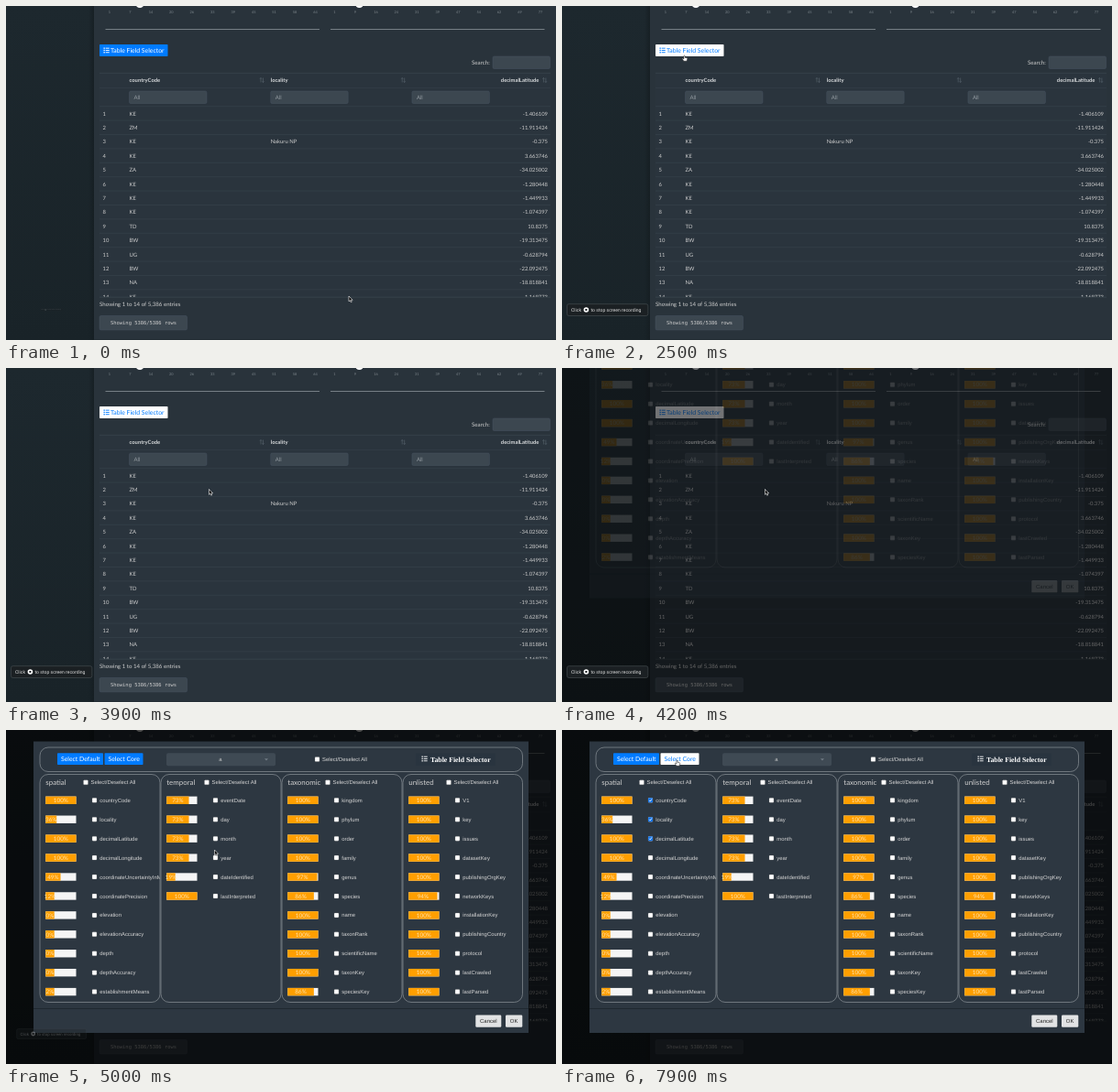
Recreate the animation shown at these times as an HTML page. Size 600 by 365 pixels, loop 8 s.

```html
<!DOCTYPE html>
<html lang="en">
<head>
<meta charset="utf-8">
<title>Table field selector</title>
<style>
  html, body { margin: 0; height: 100%; overflow: hidden; background: #29333b; }
  svg { display: block; width: 100vw; height: 100vh; text-rendering: geometricPrecision; }
  text { white-space: pre; }
</style>
</head>
<body>
<svg id="stage" viewBox="0 0 600 365" preserveAspectRatio="none"></svg>
<script>
const LATO = "Lato, sans-serif";
const ARIAL = "'Liberation Sans', Arial, sans-serif";
const SERIF = "'Liberation Serif', serif";
const MONO = "'DejaVu Sans Mono', monospace";
const LOOP = 8000;

// Markup helpers; text is centred vertically on y.
const rect = (x, y, w, h, fill, extra = "") =>
  `<rect x="${x}" y="${y}" width="${w}" height="${h}" fill="${fill}" ${extra}/>`;
const line = (x1, x2, y, color, width = .6) =>
  `<path d="M${x1} ${y}H${x2}" stroke="${color}" stroke-width="${width}"/>`;
const text = (x, y, value, size, fill = "#cdcdcd", font = LATO, anchor = "start", extra = "") =>
  `<text x="${x}" y="${y + size * .35}" font-size="${size}" fill="${fill}" font-family="${font}" text-anchor="${anchor}" ${extra}>${value}</text>`;
const outline = (x, y, w, h) =>
  rect(x, y, w, h, "none", 'rx="9" stroke="#8b9299" stroke-width=".7"');
const checkbox = (x, y, id = "") =>
  rect(x - 2.5, y - 2.5, 5, 5, "#fff", 'rx=".8" stroke="#777" stroke-width=".3"') +
  (id && `<g id="${id}">${rect(x - 2.5, y - 2.5, 5, 5, "#1675e8", 'rx=".8"')}
    <path d="M${x - 1.4} ${y}l1.1 1.2 1.8-2.5" fill="none" stroke="#fff" stroke-width=".8"/></g>`);
const listIcon = (x, y) => [0, 2.3, 4.6].map(d =>
  rect(x, y + d, 1.3, 1.3, "currentColor") + rect(x + 2.2, y + d + .2, 4, .9, "currentColor")).join("");
const button = (id, x, y, w, h, label, labelX, icon = "") =>
  `<g id="${id}">${rect(x, y, w, h, "#007bff", 'rx=".8"')}${icon}${text(labelX, y + h / 2, label, 6.87, "currentColor")}</g>`;

function slider(x, max, handleX) {
  let out = `<circle cx="${handleX}" cy="-2.6" r="4.6" fill="#fff"/>`;
  for (let i = 0; i <= 10; i++)
    out += text(x + i * 22.45, 6.5, Math.round(1 + (max - 1) * i / 10), 3.9, "#7f888e", LATO, "middle");
  return out + line(x - 4.5, x + 229, 25.5, "#8b9398", .8);
}

function tablePage() {
  const rows = [["KE", "-1.406109"], ["ZM", "-11.911424"], ["KE", "-0.375"], ["KE", "3.663746"],
    ["ZA", "-34.025002"], ["KE", "-1.280448"], ["KE", "-1.449933"], ["KE", "-1.074397"],
    ["TD", "10.8375"], ["BW", "-19.313475"], ["UG", "-0.628794"], ["BW", "-22.092475"],
    ["NA", "-18.818841"], ["KE", "-1.169773"]];
  const field = 'rx="1.5" stroke="#4c5a67" stroke-width=".4"';
  let out = rect(0, 0, 600, 365, "#29333b") + rect(0, 0, 96, 365, "url(#side)") +
    rect(90, 0, 6, 365, "url(#edge)") + line(96, 600, 364.5, "#1d262c") +
    slider(113, 64, 146) + slider(358.5, 77, 385.5) +
    button("fields", 102, 42, 74.5, 13, "Table Field Selector", 114, listIcon(106.5, 45.5)) +
    text(508, 62, "Search:", 6.2) + rect(531, 55, 62.5, 13.5, "#3c4750", field) +
    rect(102, 73, 492, 245, "#2a343d") + line(102, 594, 73.3, "#3f4a53") + line(102, 594, 89.5, "#343f48") +
    text(134.5, 81, "countryCode", 5.85, "#d5d8da", LATO, "start", 'font-weight="bold"') +
    text(288.7, 81, "locality", 5.85, "#d5d8da", LATO, "start", 'font-weight="bold"') +
    text(581.5, 81, "decimalLatitude", 5.85, "#d5d8da", LATO, "end", 'font-weight="bold"');
  for (let i = 0; i < 3; i++) {
    const x = 134.5 + i * 154.2;
    out += rect(x, 93, 84.5, 13.5, "#3c4750", field) + text(x + 5, 100, "All", 6, "#939ba1") +
      `<path d="M${x + 143.5} 83.5v-5m-1 1.2l1-1.2 1 1.2M${x + 146} 78.5v5m-1-1.2l1 1.2 1-1.2" fill="none" stroke="#65717a" stroke-width=".5"/>`;
  }
  out += '<g clip-path="url(#tableClip)">';
  rows.forEach(([code, latitude], i) => {
    const y = 117.5 + i * 15.4;
    out += line(102, 594, y - 7.8, "#38434c") + text(105.5, y, i + 1, 5.85) +
      text(134.5, y, code, 5.9) + text(591, y, latitude, 5.85, "#cdcdcd", LATO, "end");
  });
  return out + text(288.7, 148.3, "Nakuru NP", 5.9) + "</g>" + line(102, 594, 318.2, "#414c55") +
    text(102, 325.5, "Showing 1 to 14 of 5,386 entries", 6.15) +
    rect(102, 338.5, 95.5, 15.5, "#3c4750", field) +
    text(150, 346.5, "Showing 5386/5386 rows", 5.44, "#cdcdcd", MONO, "middle");
}

// Each field is "name" (100% filled) or "name:percent".
const groups = {
  spatial: "countryCode locality:36 decimalLatitude decimalLongitude coordinateUncertaintyInMeters:49 coordinatePrecision:12 elevation:0 elevationAccuracy:0 depth:0 depthAccuracy:0 establishmentMeans:2",
  temporal: "eventDate:73 day:73 month:73 year:73 dateIdentified:19 lastInterpreted",
  taxonomic: "kingdom phylum order family genus:97 species:86 name taxonRank scientificName taxonKey speciesKey:86",
  unlisted: "V1 key issues datasetKey publishingOrgKey networkKeys:94 installationKey publishingCountry protocol lastCrawled lastParsed"
};
const checkedFields = ["countryCode", "locality", "decimalLatitude"];

function modal() {
  let out = rect(30, 12.5, 540, 318.5, "#2d3741") + outline(37, 19, 526.5, 26.5) +
    button("default", 56, 25.3, 50, 12.8, "Select Default", 60) +
    button("core", 107.5, 25.3, 42, 12.8, "Select Core", 111.5) +
    rect(175, 25.3, 119, 14, "#3f4a54", 'rx="2"') + text(234, 32.3, "a", 5.9, "#cdcdcd", ARIAL, "middle") +
    '<path d="M282 31.2h4l-2 2.2z" fill="#707b84"/>' +
    checkbox(339.5, 32) + text(345, 32, "Select/Deselect All", 5.9, "#d5d5d5", ARIAL) +
    rect(447, 25.5, 87, 13.5, "#29343f") + `<g color="#fff">${listIcon(453.5, 28.5)}</g>` +
    text(463, 31.8, "Table Field Selector", 7.75, "#fff", SERIF, "start", 'font-weight="bold"');
  Object.entries(groups).forEach(([title, fields], column) => {
    const dx = column * 132;
    out += outline(37 + dx, 48.5, column < 3 ? 131 : 130.5, 249) +
      `<g transform="translate(${dx})" clip-path="url(#columnClip)">` +
      text(43.3, 57, title, 7.9) + checkbox(87, 57.3) +
      text(92.5, 57.3, "Select/Deselect All", 5.9, "#d5d5d5", ARIAL);
    fields.split(" ").forEach((field, row) => {
      const [name, percent = 100] = field.split(":");
      const y = 76.8 + row * 20.93, filled = Math.max(9.5, 33.3 * percent / 100);
      out += rect(43.2, y - 4.2, 33.3, 8.4, "#f5f5f5") + rect(43.2, y - 4.2, filled, 8.4, "#ff9f00") +
        text(43.2 + filled / 2, y, percent + "%", 6.3, "#ffe3ae", LATO, "middle") +
        checkbox(96.5, y, checkedFields.includes(name) ? "check-" + name : "") +
        text(102.3, y, name, 5.92, "#d5d5d5", ARIAL);
    });
    out += "</g>";
  });
  const footerButton = (x, w, label) => rect(x, 311.5, w, 13.3, "#e2e3e4", 'rx="1.2"') +
    text(x + w / 2, 318.2, label, 5.95, "#222", ARIAL, "middle");
  return out + line(30, 570, 304.5, "#1d252c", .8) + footerButton(512.3, 28, "Cancel") + footerButton(545, 18.3, "OK");
}

const tooltip = rect(5.5, 325.7, 88.3, 12.8, "#1b2023", 'rx="2" stroke="#4a5155" stroke-width=".6"') +
  text(10, 332, "Click", 5.1, "#ddd", "Roboto, sans-serif") +
  '<circle cx="26.4" cy="332" r="2.8" fill="#fff"/>' + rect(25.4, 331, 2, 2, "#1b2023") +
  text(31.5, 332, "to stop screen recording", 5.1, "#ddd", "Roboto, sans-serif");

stage.innerHTML = `<defs>
  <linearGradient id="side" x2="0" y2="1"><stop stop-color="#1d282e"/><stop offset="1" stop-color="#192328"/></linearGradient>
  <linearGradient id="edge"><stop stop-color="#141c20" stop-opacity="0"/><stop offset="1" stop-color="#141c20" stop-opacity=".7"/></linearGradient>
  <clipPath id="tableClip"><rect x="102" y="109" width="492" height="209"/></clipPath>
  <clipPath id="columnClip"><rect x="37" y="48" width="130.8" height="250"/></clipPath></defs>
  ${tablePage()}${rect(0, 0, 600, 365, "#000", 'id="backdrop"')}
  <g id="modal">${modal()}</g><g id="tooltip">${tooltip}</g>
  <g id="cursor">
    <path id="arrow" d="M0 0V5.8L1.3 4.6 2.2 6.7 3.2 6.3 2.3 4.3H4.1Z" fill="#000" stroke="#fff" stroke-width=".6"/>
    <path id="hand" d="M-.6 .4Q0-.4 .6 .4V2.3L2.9 2.8Q3.4 3 3.3 3.7L2.7 6.2H-.7L-2.3 3.7Q-2.2 2.8-1.4 3.3L-.6 4Z" fill="#fff" stroke="#111" stroke-width=".5"/>
  </g>`;

const $ = id => document.getElementById(id);
const clamp = v => Math.min(1, Math.max(0, v));
const ramp = (t, from, to) => clamp((t - from) / (to - from));
const smooth = k => k * k * (3 - 2 * k);
const mix = (a, b, k) => a + (b - a) * k;

function track(keys, t) {
  let i = keys.findIndex(key => key[0] > t);
  if (i < 0) return keys.at(-1).slice(1);
  if (i === 0) return keys[0].slice(1);
  const a = keys[i - 1], b = keys[i], k = smooth(ramp(t, a[0], b[0]));
  return a.slice(1).map((v, n) => mix(v, b[n + 1], k));
}

const cursorPath = [[500, 374, 317], [1400, 133.5, 54], [3150, 133.5, 54], [3600, 221.5, 132.5],
  [4650, 221.5, 132.5], [5000, 227.5, 131], [5500, 128, 33], [6080, 124, 32], [6300, 88, 30.5],
  [7100, 88, 30.5], [7450, 122, 32.5], [7900, 125.5, 33]];
const tooltipScale = [[0, .28, .25], [100, .4, .35], [200, .6, .55], [450, .6, .55], [600, 1, 1],
  [4700, 1, 1], [5000, .86, .3], [5250, .7, 0]];

// k = 0 is the blue button, k = 1 the inverted white one.
function invert(id, k) {
  const blend = (a, b) => `rgb(${a.map((v, i) => mix(v, b[i], k))})`;
  const blue = [0, 123, 255], white = [255, 255, 255];
  $(id).firstElementChild.setAttribute("fill", blend(blue, white));
  $(id).setAttribute("color", blend(white, blue));
}

function draw(t) {
  invert("fields", ramp(t, 1370, 1570));
  invert("default", ramp(t, 6270, 6520) - ramp(t, 7280, 7530));
  invert("core", ramp(t, 5430, 5650) - ramp(t, 6140, 6390) + ramp(t, 7330, 7580));

  $("backdrop").setAttribute("opacity", .7 * ramp(t, 4050, 4260));
  $("modal").setAttribute("opacity", ramp(t, 4178, 4328));
  $("modal").setAttribute("transform", `translate(0 ${-80 * (1 - ramp(t, 4200, 4500)) ** 2})`);
  checkedFields.forEach(name => $("check-" + name).setAttribute("opacity", t >= 6800 ? 1 : 0));

  const [scale, opacity] = track(tooltipScale, t);
  $("tooltip").setAttribute("opacity", opacity);
  $("tooltip").setAttribute("transform", `translate(49.7 332) scale(${scale}) translate(-49.7 -332)`);

  const [x, y] = track(cursorPath, t);
  const pointing = (t > 1370 && t < 3200) || (t > 5430 && t < LOOP);
  $("cursor").setAttribute("transform", `translate(${x} ${y})`);
  $("hand").setAttribute("opacity", pointing ? 1 : 0);
  $("arrow").setAttribute("opacity", pointing ? 0 : 1);
}

const start = performance.now();
function tick() {
  draw((performance.now() - start) % LOOP);
  requestAnimationFrame(tick);
}
tick();
</script>
</body>
</html>
```
